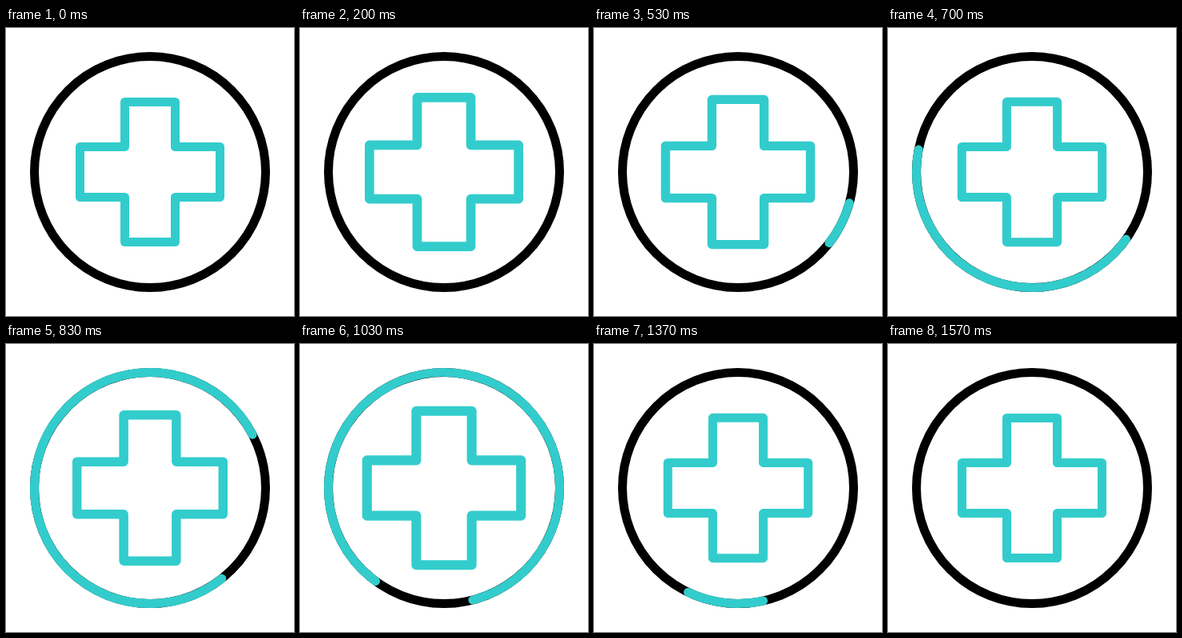
Write an HTML page that moves like this. It is 360 by 360 pixels and loops after 1670 ms.

```html
<!DOCTYPE html>
<html lang="en">
<head>
<meta charset="utf-8">
<title>Medical cross</title>
<style>
  html, body { margin: 0; width: 100%; height: 100%; overflow: hidden; background: #fff; }
  svg { display: block; width: 100vw; height: 100vh; }
</style>
</head>
<body>
<svg viewBox="0 0 360 360">
  <g transform="translate(180 180)" fill="none" stroke="#33cccc" stroke-width="11"
     stroke-linecap="round" stroke-linejoin="round">
    <circle r="144.5" stroke="#000"/>
    <path id="arc"/>
    <path id="cross" d="M-31.5-87.5h63v56h56v63h-56v56h-63v-56h-56v-63h56z"/>
  </g>
</svg>
<script>
  const LOOP = 1670, LAST = 47, R = 144.5;
  const PULSE = [0, 10, 20, 31, 42]; // low, high, low, high, low
  const arc = document.getElementById('arc');
  const cross = document.getElementById('cross');

  // eased progress between two steps
  const ease = (n, from, to) => {
    const u = Math.min(1, Math.max(0, (n - from) / (to - from)));
    return u * u * (3 - 2 * u);
  };

  // 30 steps per second, then a short rest on the last one
  const stepAt = ms => Math.min(LAST, Math.floor((Math.floor(ms / 10) * 3 + 1) / 10));

  const pulse = n => {
    let level = 0;
    for (let i = 1; i < PULSE.length; i++) {
      level += (i % 2 ? 1 : -1) * ease(n, PULSE[i - 1], PULSE[i]);
    }
    return 1 + 0.1 * level;
  };

  const point = deg => {
    const a = deg * Math.PI / 180;
    return (R * Math.cos(a)).toFixed(3) + ' ' + (R * Math.sin(a)).toFixed(3);
  };

  const arcPath = (from, to) => {
    if (to - from < 0.05) return '';
    const half = `A${R} ${R} 0 0 1 `;
    return 'M' + point(from) + half + point((from + to) / 2) + half + point(to);
  };

  function draw(ms) {
    const n = stepAt(ms);
    const turn = 4 * (n - 12.1);
    const head = 360 * ease(n, 13.5, 30);
    const tail = 360 * ease(n, 26.8, 44.6);
    arc.setAttribute('d', arcPath(turn + tail, turn + head));
    cross.setAttribute('transform', `scale(${pulse(n).toFixed(4)})`);
  }

  let start = null;
  function tick(now) {
    if (start === null) start = now;
    draw((now - start) % LOOP);
    requestAnimationFrame(tick);
  }
  draw(0);
  requestAnimationFrame(tick);
</script>
</body>
</html>
```
